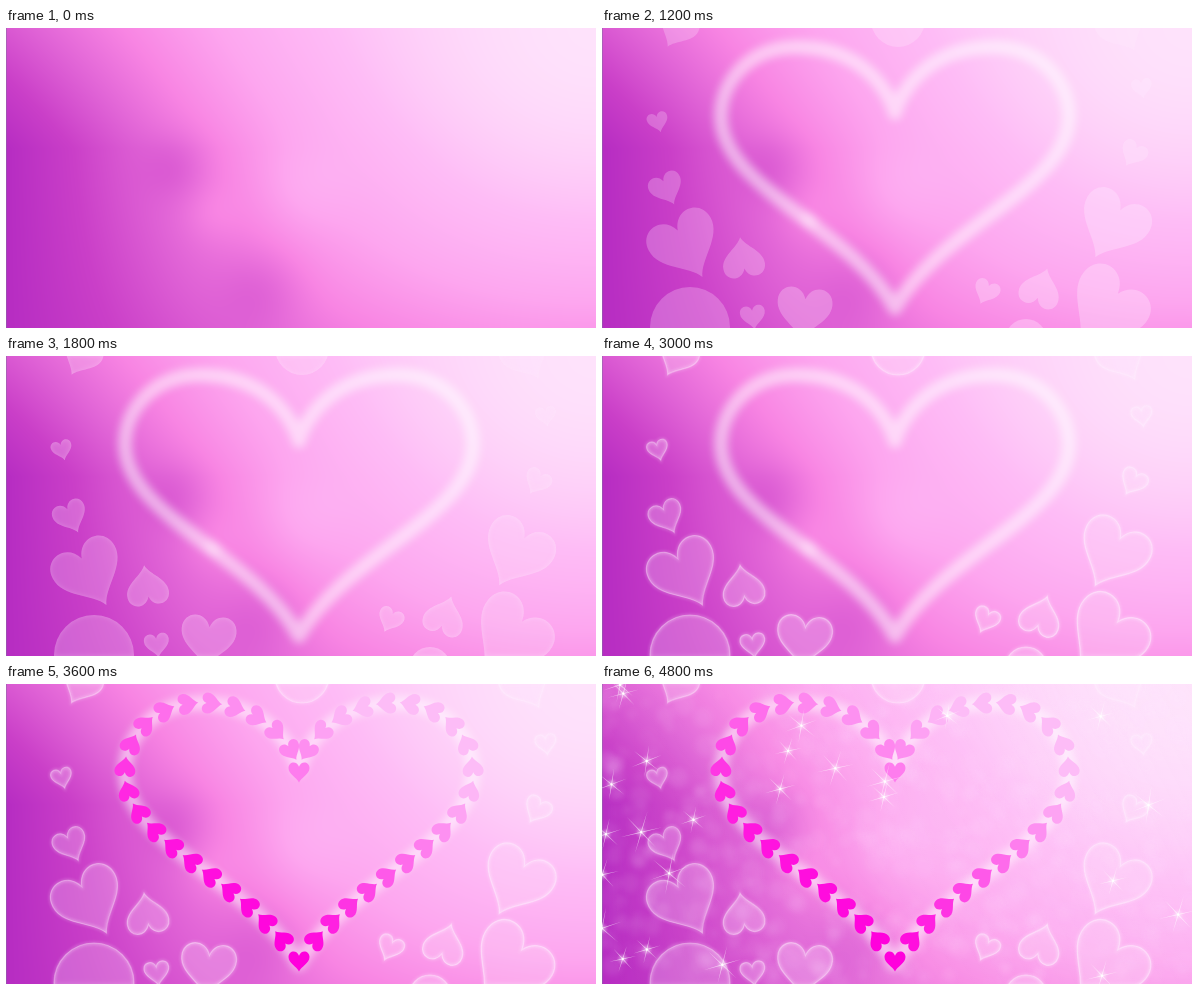
Recreate the animation shown at these times as an HTML page with a canvas. Size 590 by 300 pixels, loop 5.4 s.

```html
<!DOCTYPE html>
<html lang="en">
<head>
<meta charset="utf-8">
<title>Hearts</title>
<style>
html, body { margin: 0; width: 100%; height: 100%; overflow: hidden; background: #f9f; }
canvas, svg { position: absolute; left: 0; top: 0; width: 590px; height: 300px; overflow: hidden; }
</style>
</head>
<body>
<script>
const W = 590, H = 300, STEP = 600, STEPS = 9;
const HEART = 'M0 .5C-.1 .26-.5 .12-.5-.19C-.5-.5-.1-.56 0-.25C.1-.56.5-.5.5-.19C.5.12.1.26 0 .5Z';
const HALF = 'M293 85C288 66 262 19 195 19C145 19 119 56 119 88C119 160 245 196 293 280';
const MIRROR = 'translate(586 0) scale(-1 1)';

// Backdrop shades from dark to light.
const SHADES = ['b62cc2', 'ca3fc8', 'e063d6', 'f885e3', 'fda6ef', 'febcf6', 'fee2fb']
  .map(hex => [0, 2, 4].map(i => parseInt(hex.slice(i, i + 2), 16)));

// Small hearts: centre x, centre y, size, angle.
const HEARTS = [
  [75, 1, 40, 28], [521, 1, 50, -28], [540, 60, 21, -8], [531, 126, 27, 30],
  [56, 94, 21, -15], [65, 161, 34, -25], [84, 218, 70, -28], [141, 230, 42, 172],
  [151, 289, 25, -8], [202, 285, 55, 6], [384, 264, 26, 25], [439, 260, 41, 198],
  [510, 198, 71, 28], [503, 281, 80, 40]
];
const DISCS = [[296, -8, 27], [88, 299, 40], [424, 312, 21]];

function make(tag, attrs, parent) {
  const el = document.createElementNS('http://www.w3.org/2000/svg', tag);
  for (const key in attrs) el.setAttribute(key, attrs[key]);
  return parent.appendChild(el);
}

function canvas() {
  const el = document.createElement('canvas');
  el.width = W;
  el.height = H;
  document.body.append(el);
  return el.getContext('2d');
}

// Shows an element from one step up to another, with hard cuts.
function show(el, from, to = STEPS) {
  const key = (step, opacity) => ({ offset: step / STEPS, opacity, easing: 'step-end' });
  const frames = [key(0, 0), key(from, 1)];
  if (to < STEPS) frames.push(key(to, 0));
  frames.push(key(STEPS, to < STEPS ? 0 : 1));
  el.animate(frames, { duration: STEP * STEPS, iterations: Infinity });
}

function random(seed) {
  return () => (seed = seed * 16807 % 2147483647) / 2147483647;
}

const clamp = v => Math.max(0, Math.min(1, v));
const mix = (a, b, k) => a.map((v, i) => v + (b[i] - v) * k);

function shade(v) {
  const at = clamp(v) * (SHADES.length - 1), i = Math.min(Math.floor(at), SHADES.length - 2);
  return mix(SHADES[i], SHADES[i + 1], at - i);
}

// Lightness grows to the right and fades downwards, with a few soft folds.
function lightness(x, y) {
  const left = .28 * Math.max(0, 1 - y / 120);
  const right = 1 - .4 * (y / H) ** 2;
  const fold = (cx, cy, r, depth) => depth * Math.exp(-((x - cx) ** 2 + (y - cy) ** 2) / r ** 2);
  return left + (right - left) * Math.sin(Math.PI / 2 * x / W)
    + fold(170, 140, 32, -.09) + fold(255, 260, 42, -.1)
    + fold(205, 185, 28, .05) + fold(298, 158, 45, .07);
}

function drawBackdrop() {
  const ctx = canvas(), image = ctx.createImageData(W, H);
  for (let y = 0; y < H; y++) for (let x = 0; x < W; x++)
    image.data.set([...shade(lightness(x, y)), 255], (y * W + x) * 4);
  ctx.putImageData(image, 0, 0);
  ctx.fillStyle = 'rgba(130,110,160,.5)';
  ctx.fillRect(0, 0, 1, H);
}

function drawMottle() {
  const ctx = canvas(), rnd = random(71);
  const lift = ctx.createLinearGradient(0, H, W, 0);
  lift.addColorStop(0, 'rgba(255,235,255,0)');
  lift.addColorStop(1, 'rgba(255,235,255,.2)');
  ctx.fillStyle = lift;
  ctx.fillRect(0, 0, W, H);
  ctx.filter = 'blur(3px)';
  for (let i = 0; i < 600; i++) {
    ctx.fillStyle = `rgba(255,225,255,${.03 + rnd() * .08})`;
    ctx.beginPath();
    ctx.arc(rnd() * W, rnd() * H, 4 + rnd() * 7, 0, 7);
    ctx.fill();
  }
  show(ctx.canvas, 7);
}

function drawGlow() {
  const layer = make('g', {}, svg);
  const glow = make('g', { fill: 'none', stroke: '#fff', 'stroke-linecap': 'round',
    'stroke-width': 14, opacity: .52, filter: 'url(#soft)' }, layer);
  make('path', { d: HALF, id: 'half' }, glow);
  make('path', { d: HALF, transform: MIRROR }, glow);
  make('ellipse', { cx: 207, cy: 192, rx: 9, ry: 5, transform: 'rotate(35 207 192)',
    fill: '#fff', opacity: .35, filter: 'url(#soft)' }, layer);
  show(layer, 1);
}

function heart(parent, x, y, size, angle, attrs) {
  make('path', { d: HEART, transform: `translate(${x} ${y}) rotate(${angle}) scale(${size})`,
    'vector-effect': 'non-scaling-stroke', ...attrs }, parent);
}

// One look of the small hearts; they whiten towards the right.
function drawHearts(attrs, from, to) {
  const layer = make('g', {}, svg);
  const group = make('g', attrs, layer);
  const opacity = x => .6 + .4 * x / W;
  HEARTS.forEach(h => heart(group, ...h, { opacity: opacity(h[0]) }));
  DISCS.forEach(([cx, cy, r]) => make('circle', { cx, cy, r, opacity: opacity(cx) }, group));
  show(layer, from, to);
}

function chainColor(x, y) {
  const k = clamp(((x - 150) * .6 + 180 - y) / 270);
  return `rgb(${mix([255, 0, 220], [253, 188, 247], k).map(Math.round)})`;
}

function drawChain() {
  const group = make('g', {}, svg), path = document.getElementById('half');
  const first = 20, last = path.getTotalLength() - 30, count = 20;
  const add = (x, y, angle) => heart(group, x, y, 21, angle, { fill: chainColor(x, y) });
  add(293, 88, 0);
  for (let i = 0; i < count; i++) {
    const at = first + (last - first) * i / (count - 1);
    const [a, p, b] = [at - 2, at, at + 2].map(d => path.getPointAtLength(d));
    const angle = Math.atan2(b.y - a.y, b.x - a.x) * 180 / Math.PI + 90;
    add(p.x, p.y, angle);
    add(586 - p.x, p.y, -angle);
  }
  add(293, 277, 0);
  show(group, 6);
}

// Sparkles gather on the left and thin out to the right.
function drawStars() {
  const group = make('g', { fill: '#fff' }, svg), rnd = random(29);
  for (let i = 0; i < 25; i++) {
    const x = W * rnd() ** 1.5, y = H * rnd(), r = 13 + 9 * rnd();
    const star = make('g', { transform: `translate(${x} ${y}) rotate(${8 + 10 * rnd()})` }, group);
    make('circle', { r: 4, opacity: .4, filter: 'url(#spark)' }, star);
    make('circle', { r: 1.2, opacity: .9 }, star);
    for (let turn = 0; turn < 180; turn += 60)
      make('path', { d: `M0 ${-r}L.5 0L0 ${r}L-.5 0Z`, transform: `rotate(${turn})`, opacity: .6 }, star);
  }
  show(group, 8);
}

drawBackdrop();
drawMottle();
const svg = make('svg', { viewBox: `0 0 ${W} ${H}` }, document.body);
const region = 'filterUnits="userSpaceOnUse" x="-50" y="-50" width="690" height="400"';
svg.innerHTML = `<defs>
  <filter id="soft" ${region}><feGaussianBlur stdDeviation="4.5"/></filter>
  <filter id="halo" ${region}><feGaussianBlur stdDeviation="1.8"/></filter>
  <filter id="spark" x="-1" y="-1" width="3" height="3"><feGaussianBlur stdDeviation="1.5"/></filter>
  <filter id="inner" ${region}>
    <feGaussianBlur in="SourceAlpha" stdDeviation="2.5" result="b"/>
    <feComposite in="SourceGraphic" in2="b" operator="out"/>
  </filter></defs>`;
const filled = { fill: '#ffe6fd' }, lined = { fill: 'none', stroke: '#ffeefe' };
drawGlow();
drawHearts({ ...filled, opacity: .4 }, 2, 3);
drawHearts({ ...filled, opacity: .24 }, 3);
drawHearts({ ...filled, opacity: .5, filter: 'url(#inner)' }, 3);
drawHearts({ ...lined, 'stroke-width': 1, opacity: .25 }, 4, 5);
drawHearts({ ...lined, 'stroke-width': 3, opacity: .35, filter: 'url(#halo)' }, 5);
drawHearts({ ...lined, 'stroke-width': 1.2, opacity: .5 }, 5);
drawChain();
drawStars();
</script>
</body>
</html>
```
